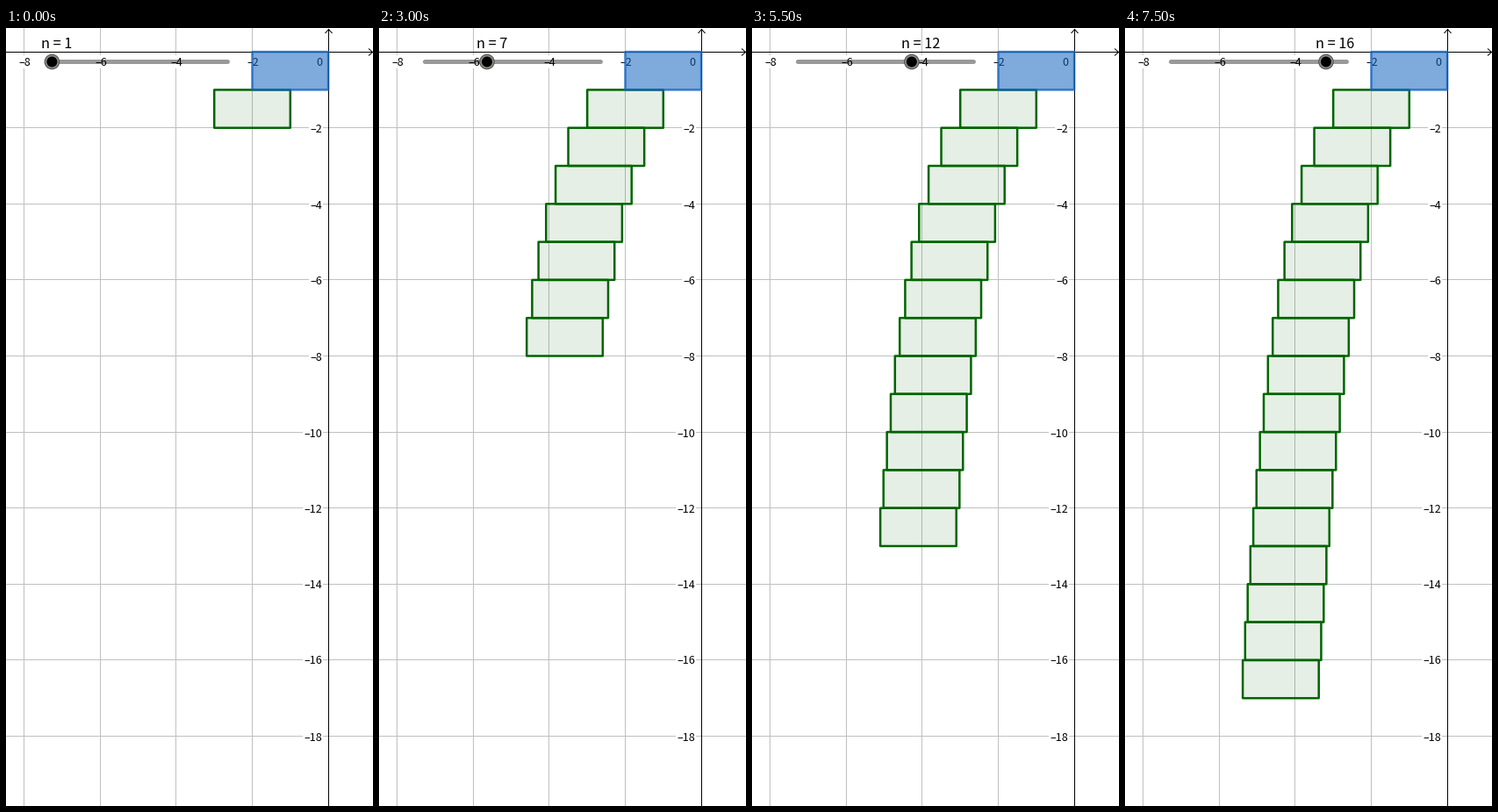
A matplotlib script for the animation above (8 s loop, 418 by 886 pixels).

```python
from math import floor

import matplotlib.pyplot as plt
from matplotlib.animation import FuncAnimation
from matplotlib.patches import Circle, Rectangle

W, H, DPI = 418, 886, 100
X0, Y0, UNIT = 367.1, 27.1, 43.3
STEPS, INTERVAL = 16, 500
KNOB_X, KNOB_STEP, TRACK_Y = 52.4, 11.77, 38.5
FONT = "Noto Sans CJK JP"
PX = 72 / DPI

fig = plt.figure(figsize=(W / DPI, H / DPI), dpi=DPI, facecolor="white")
ax = fig.add_axes([0, 0, 1, 1])
ax.set(xlim=(0, W), ylim=(H, 0))
ax.axis("off")


def line(xs, ys, color="black", width=1, z=2, **kw):
    kw.setdefault("solid_capstyle", "butt")
    return ax.plot(xs, ys, color=color, lw=width * PX, zorder=z,
                   snap=False, **kw)[0]


def label(x, y, s, size=12.5, ha="center", z=3):
    return ax.text(x, y, s, fontsize=size * PX, family=FONT, ha=ha,
                   va="baseline", zorder=z)


def brick(right, top, color, fill, edge, z):
    """A 2 x 1 block given by its top right corner in axis units."""
    corner = (X0 + (right - 2) * UNIT, Y0 + top * UNIT)
    for kw in (dict(fc=color, ec="none", alpha=fill),
               dict(fc="none", ec=color, alpha=edge, lw=2.5 * PX)):
        yield ax.add_patch(Rectangle(corner, 2 * UNIT, UNIT, zorder=z,
                                     snap=False, joinstyle="round", **kw))


def crisp(v):
    return floor(v) + 0.5


# Grid lines leave a gap around the axis numbers
for k in range(2, 10, 2):
    x = crisp(X0 - k * UNIT)
    line([x, x], [0, 31], "#c0c0c0", z=1)
    line([x, x], [46, H], "#c0c0c0", z=1)
    label(x + 0.5, 43, f"\u2013{k}")
for k in range(2, 20, 2):
    y = crisp(Y0 + k * UNIT)
    line([0, 345 if k < 10 else 338], [y, y], "#c0c0c0", z=1)
    line([361, W], [y, y], "#c0c0c0", z=1)
    label(360, y + 5, f"\u2013{k}", ha="right")
label(356.5, 43, "0")

# Axes with open arrow heads
ax_x, ax_y = crisp(X0), crisp(Y0)
line([0, W], [ax_y, ax_y])
line([ax_x, ax_x], [1, H])
line([W - 5, W - 0.5, W - 5], [ax_y - 4, ax_y, ax_y + 4])
line([ax_x - 4, ax_x, ax_x + 4], [6, 1.5, 6])

# Each brick hangs out 1/k further than the one above
bricks, shift = [], 0
for k in range(1, STEPS + 1):
    shift += 1 / k
    bricks.append(list(brick(-shift, k, "#006400", 0.1, 1, 4)))

list(brick(0, 0, "#1565c0", 0.55, 0.8, 5))

# Slider
line([KNOB_X, KNOB_X + 17 * KNOB_STEP], [TRACK_Y] * 2, width=5, z=6,
     alpha=0.4, solid_capstyle="round")
ring = ax.add_patch(Circle((0, 0), 8.2, fc="#8c8f89", ec="#555753",
                           lw=1.2 * PX, zorder=7))
knob = ax.add_patch(Circle((0, 0), 6, fc="black", ec="none", zorder=8))
value = label(0, 23, "", size=16.3, ha="left", z=8)


def update(i):
    x = KNOB_X + i * KNOB_STEP
    ring.center = knob.center = (x, TRACK_Y)
    value.set_x(x - 12.3)
    value.set_text(f"n = {i + 1}")
    for k, parts in enumerate(bricks):
        for p in parts:
            p.set_visible(k <= i)
    return [ring, knob, value]


anim = FuncAnimation(fig, update, frames=STEPS, interval=INTERVAL,
                     repeat=True, repeat_delay=0, blit=False)
plt.show()
```
